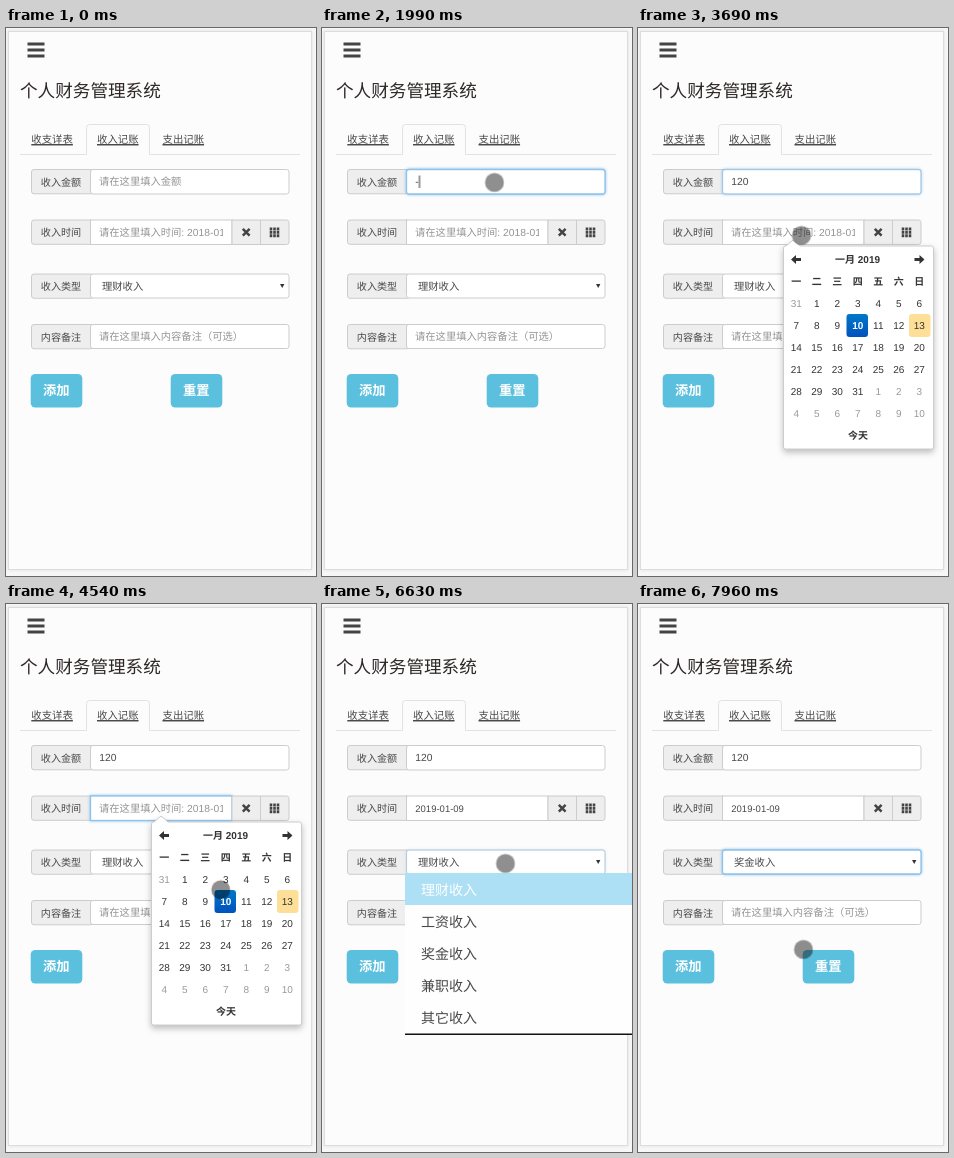
These frames come from a looping animation (310 by 548 pixels, 8 s). An HTML page:

```html
<!DOCTYPE html>
<html lang="zh-CN">
<head>
<meta charset="utf-8">
<title>个人财务管理系统</title>
<style>
html, body { margin: 0; width: 100%; height: 100%; overflow: hidden; background: #f7f7f7; }
svg { display: block; width: 100%; height: 100%; }
text {
  font: 10.3px "Liberation Sans", "Noto Sans CJK SC", "Noto Sans CJK", sans-serif;
  fill: #484848; text-rendering: geometricPrecision;
}
.label { font-size: 10.1px; }
.hint { fill: #949494; }
.tab { font-size: 10.4px; }
.title { font-size: 17.6px; font-weight: 300; fill: #2f2626; }
.button { font-size: 13.3px; font-weight: bold; fill: #fff; }
.addon { fill: #eee; stroke: #ccc; }
.field { fill: #fff; stroke: #ccc; }
.option { font-size: 14px; }
.hot text { fill: #fff; }
.hot rect { fill: #addff5; }
.calendar text { font-size: 10px; text-anchor: middle; fill: #333; }
.calendar .head { font-weight: bold; }
.calendar .other { fill: #999; }
.calendar .chosen { font-weight: bold; fill: #fff; }
.focus { fill: #fff; stroke: #8fc3ec; stroke-width: 1.3; filter: drop-shadow(0 0 1.8px rgba(102, 175, 233, .75)); }
.panel { fill: #fcfcfc; stroke: #ddd; filter: drop-shadow(0 0 1.5px rgba(0, 0, 0, .1)); }
.popup { fill: #fff; stroke: #ccc; filter: drop-shadow(0 3px 3px rgba(0, 0, 0, .25)); }

/* Eight-second timeline: 1% = 80 ms */
.anim { animation: 8s step-end -4ms infinite; }
.focus.anim { animation-timing-function: linear; }

#amount-hint { animation-name: amount-hint; }
#minus { animation-name: minus; }
#twelve { animation-name: twelve; }
#zero { animation-name: zero; }
#amount { animation-name: amount; }
#caret { animation-name: caret; }
#focus-amount { animation-name: focus-amount; }
#focus-date { animation-name: focus-date; }
#focus-kind { animation-name: focus-kind; }
#date-hint { animation-name: date-hint; }
#date { font-size: 9.5px; animation-name: date; }
#calendar { animation-name: calendar; }
#kind-old { animation-name: kind-old; }
#kind-new { animation-name: kind-new; }
#menu { animation-name: menu; }
#hot-0 { animation-name: hot-0; }
#hot-1 { animation-name: hot-1; }
#hot-2 { animation-name: hot-2; }
#pointer { animation-name: pointer; }
#press { animation-name: press; }

@keyframes amount-hint { 0% { opacity: 1 } 24.875%, 100% { opacity: 0 } }
@keyframes minus { 0%, 46.125%, 100% { opacity: 0 } 24.875% { opacity: 1 } }
@keyframes twelve { 0%, 46.125%, 100% { opacity: 0 } 27.75% { opacity: 1 } }
@keyframes zero { 0%, 46.125%, 100% { opacity: 0 } 30.625% { opacity: 1 } }
@keyframes amount { 0% { opacity: 0 } 46.125%, 100% { opacity: 1 } }
@keyframes caret {
  0%, 46.125%, 100% { opacity: 0; transform: translateX(93.5px) }
  15.125% { opacity: 1; transform: translateX(93.5px) }
  20.875% { opacity: 0; transform: translateX(93.5px) }
  24.875% { opacity: 1; transform: translateX(97.5px) }
  27.75% { opacity: 1; transform: translateX(108.5px) }
  30.625% { opacity: 1; transform: translateX(114.5px) }
  36.375% { opacity: 0; transform: translateX(114.5px) }
  42.3% { opacity: 1; transform: translateX(114.5px) }
}
@keyframes focus-amount { 0%, 15%, 48%, 100% { opacity: 0 } 17%, 45.2% { opacity: 1 } }
@keyframes focus-date { 0%, 46.2%, 73.1%, 100% { opacity: 0 } 48%, 72.2% { opacity: 1 } }
@keyframes focus-kind { 0%, 82.2% { opacity: 0 } 84.75%, 100% { opacity: 1 } }
@keyframes date-hint { 0% { opacity: 1 } 72.25%, 100% { opacity: 0 } }
@keyframes date { 0% { opacity: 0 } 72.25%, 100% { opacity: 1 } }
@keyframes calendar { 0%, 72.25%, 100% { opacity: 0 } 46.125% { opacity: 1 } }
@keyframes kind-old { 0% { opacity: 1 } 94.625%, 100% { opacity: 0 } }
@keyframes kind-new { 0% { opacity: 0 } 94.625%, 100% { opacity: 1 } }
@keyframes menu { 0%, 94.625%, 100% { opacity: 0 } 82.875% { opacity: 1 } }
@keyframes hot-0 { 0% { opacity: 1 } 85.78%, 100% { opacity: 0 } }
@keyframes hot-1 { 0%, 86.75%, 100% { opacity: 0 } 85.78% { opacity: 1 } }
@keyframes hot-2 { 0% { opacity: 0 } 86.75%, 100% { opacity: 1 } }
@keyframes press {
  0%, 15.125%, 46.125%, 72.25%, 82.875%, 100% { opacity: 0 }
  13.125%, 45.125%, 70.125%, 81% { opacity: 1 }
}
@keyframes pointer {
  0% { opacity: 0; transform: translate(276.5px, 529.5px) }
  3.625% { opacity: 1; transform: translate(276.5px, 529.5px); animation-timing-function: steps(3) }
  6.475% { opacity: 1; transform: translate(248px, 420px); animation-timing-function: steps(3) }
  9.325% { opacity: 1; transform: translate(199px, 243px); animation-timing-function: steps(4) }
  13.125% { transform: translate(172.5px, 154.5px) }
  37.55% { transform: translate(172.5px, 154.5px); animation-timing-function: steps(6) }
  43.25% { transform: translate(163.5px, 207.5px) }
  50.9% { transform: translate(163.5px, 207.5px); animation-timing-function: steps(5) }
  55.763% { transform: translate(218px, 280px); animation-timing-function: steps(5) }
  60.625% { transform: translate(202px, 309px) }
  63.41% { transform: translate(202px, 309px); animation-timing-function: steps(4) }
  67.25% { transform: translate(200.5px, 300px) }
  75.3% { transform: translate(200.5px, 300px); animation-timing-function: steps(6) }
  81% { transform: translate(183.5px, 259.5px) }
  82.875% { transform: translate(183.5px, 259.5px); animation-timing-function: steps(4) }
  86.75% { transform: translate(185.5px, 340px) }
  89.69% { transform: translate(185.5px, 340px); animation-timing-function: steps(3) }
  92.5% { transform: translate(185px, 355px) }
  95.5% { transform: translate(180.5px, 351.5px) }
  96.69% { transform: translate(180.5px, 351.5px); animation-timing-function: steps(3) }
  99.5%, 100% { opacity: 1; transform: translate(165.5px, 345.5px) }
}
</style>
</head>
<body>
<svg viewBox="0 0 310 548" preserveAspectRatio="none">
  <defs>
    <linearGradient id="blue" x2="0" y2="1">
      <stop offset="0" stop-color="#0078c8"/><stop offset="1" stop-color="#0052bd"/>
    </linearGradient>
    <clipPath id="date-clip"><rect x="85" y="192" width="132" height="25"/></clipPath>
  </defs>

  <rect width="310" height="548" fill="#f7f7f7"/>
  <rect class="panel" x="2.5" y="3.5" width="303" height="538"/>
  <path d="M21.5 16h17M21.5 22h17M21.5 28h17" stroke="#444" stroke-width="3"/>
  <text class="title" x="14" y="69">个人财务管理系统</text>

  <path d="M14 126.5H80.5V99.5q0-3 3-3H140.5q3 0 3 3V126.5H294" fill="none" stroke="#e2e2e2"/>
  <g text-decoration="underline">
    <text class="tab" x="25.3" y="115.3">收支详表</text>
    <text class="tab" x="91" y="115.3">收入记账</text>
    <text class="tab" x="156.5" y="115.3">支出记账</text>
  </g>

  <g id="labels"></g>

  <rect class="field" x="84.5" y="141.5" width="198.5" height="24.5" rx="2.5"/>
  <rect id="focus-amount" class="focus anim" x="84.5" y="141.5" width="198.5" height="24.5" rx="2.5"/>
  <text id="amount-hint" class="hint anim" x="93" y="157.3">请在这里填入金额</text>
  <text id="minus" class="anim" x="93.3" y="157.3">-</text>
  <text id="twelve" class="anim" x="97" y="157.3">12</text>
  <text id="zero" class="anim" x="108.5" y="157.3">0</text>
  <text id="amount" class="anim" x="93.3" y="157.3">120</text>
  <path id="caret" class="anim" d="M0 147.5v12.5" stroke="#333"/>

  <rect class="field" x="84.5" y="192" width="141.5" height="24.5"/>
  <rect id="focus-date" class="focus anim" x="84.5" y="192" width="141.5" height="24.5"/>
  <g clip-path="url(#date-clip)">
    <text id="date-hint" class="hint anim" x="93" y="208.2">请在这里填入时间: 2018-01</text>
  </g>
  <text id="date" class="anim" x="93.3" y="208">2019-01-09</text>
  <path class="addon" d="M226 192H280.5q2.5 0 2.5 2.5V214q0 2.5-2.5 2.5H226zM254.5 192v24.5"/>
  <path d="M236.8 200.8l6.8 6.8m0-6.8l-6.8 6.8" stroke="#444" stroke-width="2.5"/>
  <path d="M265 199.5v9.7M268.5 199.5v9.7M272 199.5v9.7" stroke="#444" stroke-width="2.6" stroke-dasharray="2.9 .5"/>

  <rect class="field" x="84.5" y="246" width="198.5" height="24" rx="2.5"/>
  <rect id="focus-kind" class="focus anim" x="84.5" y="246" width="198.5" height="24" rx="2.5"/>
  <text id="kind-old" class="anim" x="96" y="262">理财收入</text>
  <text id="kind-new" class="anim" x="96" y="262">奖金收入</text>
  <path d="M274 256h4.4l-2.2 4z" fill="#333"/>

  <rect class="field" x="84.5" y="296.5" width="198.5" height="24" rx="2.5"/>
  <text class="hint" x="93" y="312.2">请在这里填入内容备注（可选）</text>

  <g fill="#5bc0de">
    <rect x="24.7" y="346" width="51.6" height="33.5" rx="4.5"/>
    <rect x="164.7" y="346" width="51.6" height="33.5" rx="4.5"/>
  </g>
  <text class="button" x="37" y="367.3">添加</text>
  <text class="button" x="177" y="367.3">重置</text>

  <g id="calendar" class="calendar anim">
    <path class="popup" d="M148 218H147.5q-2 0-2 2V419q0 2 2 2H293.5q2 0 2-2V220q0-2-2-2H162l-7-6-7 6z"/>
    <path id="arrow" d="M153 231.5l5-4.5v3h5v3h-5v3z" fill="#333"/>
    <use href="#arrow" transform="matrix(-1 0 0 1 439.5 0)"/>
    <text class="head" x="219.5" y="235">一月 2019</text>
    <rect x="271" y="286" width="21.5" height="23" rx="3" fill="#fddf98"/>
    <rect x="208.5" y="286" width="21.5" height="23" rx="3" fill="url(#blue)"/>
    <g id="days"></g>
    <text class="head" x="220" y="411">今天</text>
  </g>

  <g id="menu" class="anim">
    <rect x="83" y="269" width="227" height="161" fill="#fefefe"/>
    <path d="M83 430.2h227" stroke="#111" stroke-width="1.5"/>
    <g id="options"></g>
  </g>

  <g id="pointer" class="anim">
    <circle r="9.5" fill="#000" fill-opacity=".44"/>
    <circle id="press" class="anim" r="11.7" fill="#ff0" fill-opacity=".55"/>
  </g>
</svg>
<script>
const byId = id => document.getElementById(id);
const label = (x, y, words, kind = "") => `<text class="${kind}" x="${x}" y="${y}">${words}</text>`;

const rows = [["收入金额", 141.5], ["收入时间", 192], ["收入类型", 246], ["内容备注", 296.5]];
byId("labels").innerHTML = rows.map(([name, y]) =>
  `<rect class="addon" x="25.5" y="${y}" width="62" height="24.3" rx="2.5"/>` +
  label(34.8, y + 16, name, "label")).join("");

const column = i => 158.3 + 20.5 * i;
let days = [..."一二三四五六日"].map((name, i) => label(column(i), 257, name, "head")).join("");
for (let i = 0; i < 42; i++) {
  const day = i < 1 ? 31 : i > 31 ? i - 31 : i;
  const kind = i < 1 || i > 31 ? "other" : day === 10 ? "chosen" : "";
  days += label(column(i % 7), 279 + 22 * Math.floor(i / 7), day, kind);
}
byId("days").innerHTML = days;

const kinds = ["理财收入", "工资收入", "奖金收入", "兼职收入", "其它收入"];
byId("options").innerHTML = kinds.map((name, i) => {
  const option = label(99, 291.3 + 32 * i, name, "option");
  const hot = `<g id="hot-${i}" class="hot anim"><rect x="83" y="${269 + 32 * i}" width="227" height="32"/>${option}</g>`;
  return option + (i < 3 ? hot : "");
}).join("");
</script>
</body>
</html>
```
